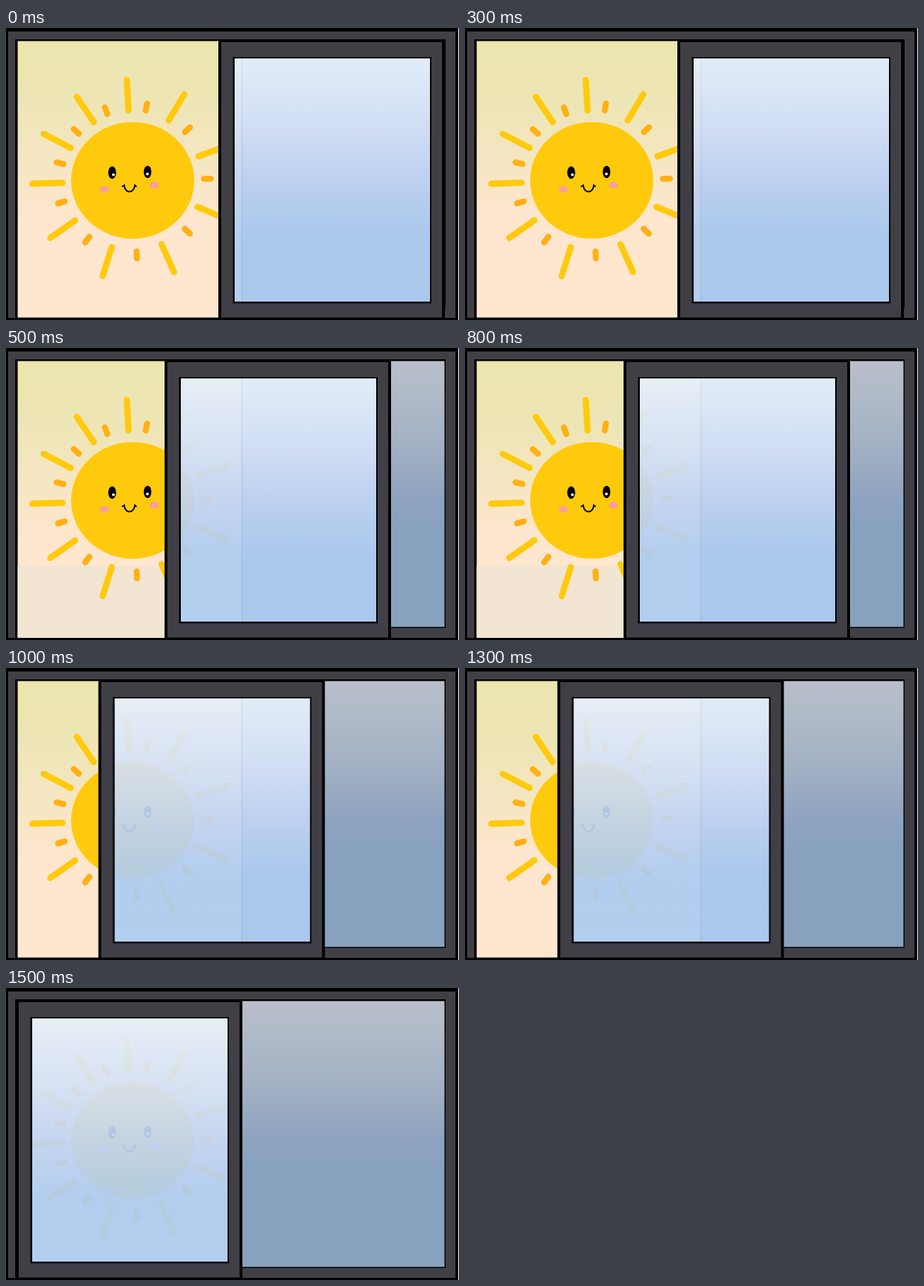
Write an HTML page that moves like this. It is 640 by 413 pixels and loops after 2000 ms.

```html
<!DOCTYPE html>
<html lang="en">
<head>
<meta charset="utf-8">
<title>Sliding window</title>
<style>
  html, body { margin: 0; width: 100%; height: 100%; overflow: hidden; background: #fff; }
  svg { display: block; width: 100%; height: 100%; }
  #sash { animation: slide 2s step-end infinite; }
  #haze { animation: flash 2s step-end infinite; }
  @keyframes slide {
    0% { transform: translateX(286px); }
    25% { transform: translateX(210px); }
    50% { transform: translateX(116.5px); }
    75%, 100% { transform: translateX(0); }
  }
  @keyframes flash {
    0% { opacity: 0; }
    25% { opacity: 1; }
    50%, 100% { opacity: 0; }
  }
</style>
</head>
<body>
<svg viewBox="0 0 640 413" preserveAspectRatio="none">
  <defs>
    <linearGradient id="sky" gradientUnits="userSpaceOnUse" x1="0" y1="18" x2="0" y2="410">
      <stop offset="0" stop-color="#ebe6ae"/>
      <stop offset=".2" stop-color="#ede5b4"/>
      <stop offset=".45" stop-color="#f6e6c3"/>
      <stop offset=".65" stop-color="#fee6cf"/>
    </linearGradient>
    <linearGradient id="pane" gradientUnits="userSpaceOnUse" x1="0" y1="18" x2="0" y2="395">
      <stop offset="0" stop-color="#b9bfca"/>
      <stop offset=".3" stop-color="#a4b2c4"/>
      <stop offset=".53" stop-color="#8ea3c0"/>
      <stop offset=".62" stop-color="#88a2be"/>
    </linearGradient>
    <linearGradient id="glass" gradientUnits="userSpaceOnUse" x1="0" y1="43" x2="0" y2="387">
      <stop offset="0" stop-color="#e6f0fc"/>
      <stop offset=".3" stop-color="#d3e0f7"/>
      <stop offset=".52" stop-color="#bfd3f3"/>
      <stop offset=".73" stop-color="#adccf0"/>
    </linearGradient>
    <clipPath id="opening"><rect x="16.5" y="18.5" width="316" height="391"/></clipPath>
  </defs>

  <rect width="639" height="413"/>
  <rect x="3" y="5" width="632" height="405" fill="#403f46"/>
  <rect x="13" y="16" width="608" height="395"/>
  <rect x="332" y="396" width="289" height="14" fill="#403f46"/>

  <g clip-path="url(#opening)">
    <rect x="16" y="18" width="317" height="392" fill="url(#sky)"/>
    <rect id="haze" x="16" y="308" width="210" height="102" fill="#f2e5d1"/>
    <ellipse cx="179" cy="215.5" rx="87" ry="82.5" fill="#ffca0c"/>
    <g id="rays" fill="none" stroke-linecap="round"></g>
    <ellipse cx="150" cy="204.5" rx="5.6" ry="9"/>
    <ellipse cx="200" cy="203.5" rx="5.4" ry="8.8"/>
    <g fill="#fff">
      <circle cx="151.8" cy="207.5" r="2"/>
      <circle cx="199.8" cy="206.5" r="2"/>
    </g>
    <g fill="#fb9d9b">
      <ellipse cx="139" cy="228.5" rx="6.6" ry="4.6"/>
      <ellipse cx="209.5" cy="222.3" rx="6.6" ry="4.6"/>
    </g>
    <path fill="none" stroke="#000" stroke-width="2" stroke-linecap="round"
      d="M164.500 224L167 222.500C168 234.500 181 234.500 182 222.500L184 224"/>
  </g>

  <rect x="334" y="18.5" width="285.5" height="376" fill="url(#pane)"/>

  <g id="sash">
    <path fill="url(#glass)" opacity=".925" d="M37 43H313V387H37Z"/>
    <path fill-rule="evenodd" d="M14 17H334V411H14ZM37 43V387H313V43Z"/>
    <path fill="#403f46" fill-rule="evenodd" d="M18 20H330V409.500H18ZM34.500 41V389.500H315V41Z"/>
  </g>
</svg>
<script>
  const sun = { x: 179, y: 215.5 };
  const hub = { x: 159, y: 200 };  // rays are evenly spaced as seen from here
  const count = 10;

  // Strokes centred on a circle around the sun, each pointing at its middle.
  function ring(start, radius, length, width, color) {
    const ox = hub.x - sun.x, oy = hub.y - sun.y;
    let d = '';
    for (let i = 0; i < count; i++) {
      const a = (start / 360 + i / count) * 2 * Math.PI;
      const b = ox * Math.cos(a) + oy * Math.sin(a);
      const t = Math.sqrt(b * b - ox * ox - oy * oy + radius * radius) - b;
      const dir = Math.atan2(oy + t * Math.sin(a), ox + t * Math.cos(a));
      const at = r => `${sun.x + r * Math.cos(dir)} ${sun.y + r * Math.sin(dir)}`;
      d += `M${at(radius - length / 2)}L${at(radius + length / 2)}`;
    }
    return `<path d="${d}" stroke="${color}" stroke-width="${width}"/>`;
  }

  document.getElementById('rays').innerHTML =
    ring(-83, 120.5, 43, 8.8, '#ffca0c') + ring(-102, 105.5, 10, 8.4, '#ffb014');
</script>
</body>
</html>
```
